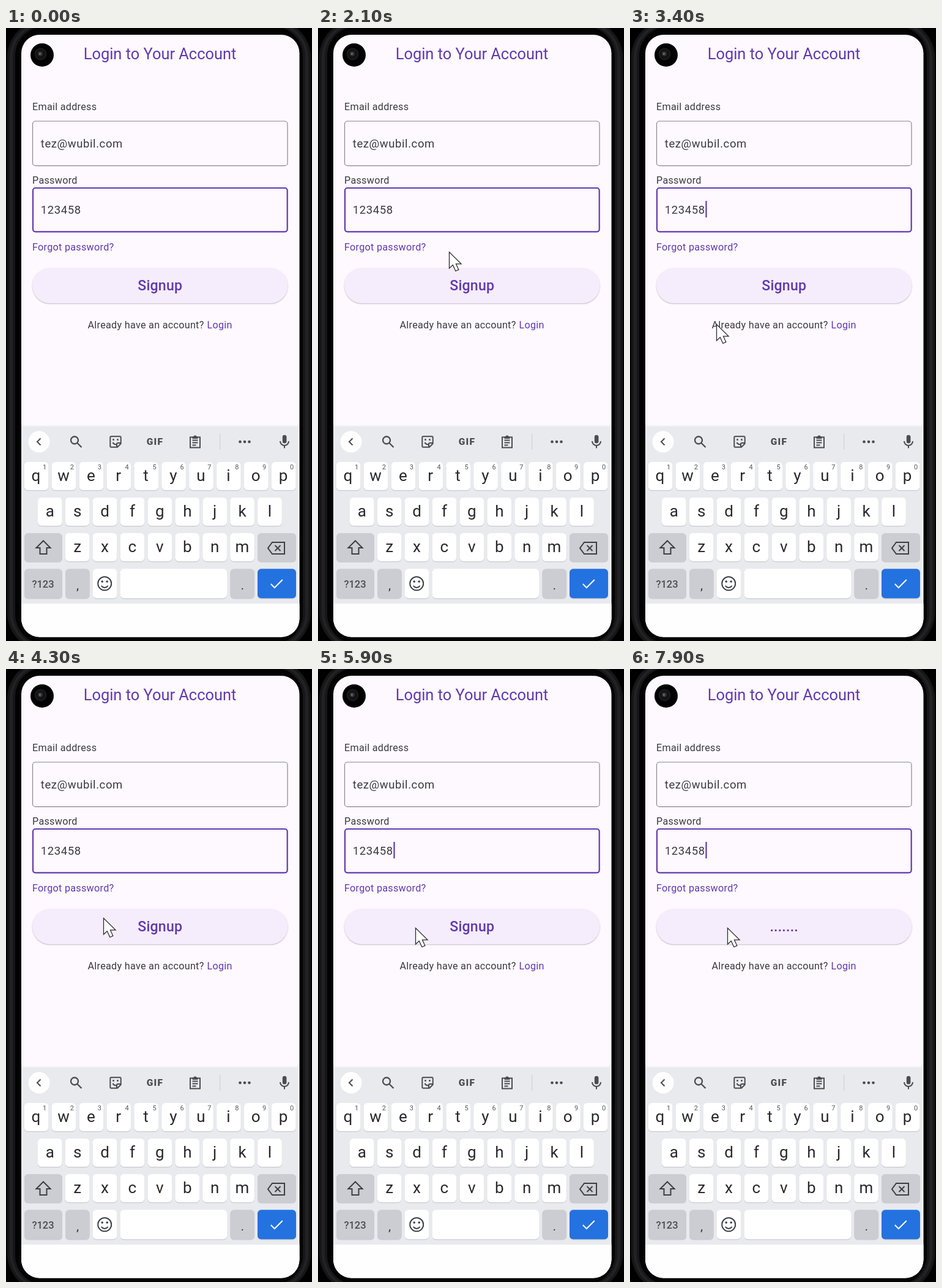
Write an HTML page with a canvas that moves like this. It is 500 by 1000 pixels and loops after 8 s.

```html
<!DOCTYPE html>
<html lang="en">
<head>
<meta charset="utf-8">
<title>Login screen</title>
<style>
  html, body { margin: 0; width: 100%; height: 100%; overflow: hidden; background: #000; }
  canvas { display: block; width: 500px; height: 1000px; }
</style>
</head>
<body>
<canvas id="stage"></canvas>
<script>
const W = 500, H = 1000, LOOP = 8000, STEP = 100;
const PURPLE = '#6138b0', INK = '#3b393f', ICON = '#4a4c50';
const KEY_GRAY = '#cbcdd3', KEY_PITCH = 44.9, KEY_W = 39.6;

const canvas = document.getElementById('stage');
const ctx = canvas.getContext('2d');
const ratio = window.devicePixelRatio || 1;
canvas.width = W * ratio;
canvas.height = H * ratio;

function box(x, y, w, h, r, fill) {
  ctx.beginPath();
  ctx.roundRect(x, y, w, h, r);
  if (fill) { ctx.fillStyle = fill; ctx.fill(); }
}

function disc(x, y, r, fill) {
  ctx.beginPath();
  ctx.arc(x, y, r, 0, Math.PI * 2);
  ctx.fillStyle = fill;
  ctx.fill();
}

function text(str, x, y, size, { color = INK, weight = 400, spacing = 0, align = 'left' } = {}) {
  ctx.font = `${weight} ${size}px Roboto, sans-serif`;
  ctx.letterSpacing = spacing + 'px';
  ctx.textAlign = align;
  ctx.fillStyle = color;
  ctx.fillText(str, x, y);
}

// Icon paths are drawn around their own centre.
function icon(x, y, d, { color = ICON, width = 2, fill = false } = {}) {
  const path = new Path2D(d);
  ctx.save();
  ctx.translate(x, y);
  ctx.lineWidth = width;
  ctx.strokeStyle = ctx.fillStyle = color;
  if (fill) ctx.fill(path); else ctx.stroke(path);
  ctx.restore();
}

function drawPhone() {
  ctx.fillStyle = '#000';
  ctx.fillRect(0, 0, W, H);
  box(2, -14, 496, 1030, 62, '#161617');
  box(6, -10, 488, 1022, 58, '#222224');
  box(11, -6, 478, 1014, 53, '#171718');
  box(15, -3, 470, 1008, 49, '#030303');

  ctx.save();
  box(25, 11, 454.5, 982.5, 30, '#fef9ff');
  ctx.clip();
  ctx.fillStyle = '#e8eaee';
  ctx.fillRect(25, 650, 452, 289);
  ctx.fillStyle = 'rgba(232,234,238,.45)';
  ctx.fillRect(25, 648, 452, 2);
  ctx.fillStyle = '#fefdff';
  ctx.fillRect(25, 939, 455, 60);
  ctx.restore();

  disc(59, 44, 19, '#020202');
  disc(56.5, 42.5, 10, '#1b1b1d');
  disc(56.5, 42.5, 7.5, '#111113');
  disc(56, 42, 4, '#303033');
  disc(55.5, 42, 1.6, '#747478');
}

function drawForm(caretOn) {
  text('Login to Your Account', 251.5, 50.5, 25.4, { color: PURPLE, align: 'center' });
  const label = { spacing: .29 }, link = { spacing: .29, color: PURPLE }, entry = { spacing: .58 };
  text('Email address', 43, 133.5, 16.17, label);
  text('Password', 43, 253.5, 16.17, label);
  text('Forgot password?', 43, 362.5, 16.17, link);
  text('Already have an account? ', 133.5, 489.5, 16.17, label);
  text('Login', 328.5, 489.5, 16.17, link);

  box(43.5, 152, 416.5, 72.7, 4.5);
  ctx.lineWidth = 1.2;
  ctx.strokeStyle = '#89858d';
  ctx.stroke();
  box(44, 261, 415.7, 71.3, 4);
  ctx.lineWidth = 2.2;
  ctx.strokeStyle = PURPLE;
  ctx.stroke();

  text('tez@wubil.com', 56.8, 195, 18.5, entry);
  text('123458', 56.8, 303.2, 18.5, entry);
  if (caretOn) {
    ctx.fillStyle = PURPLE;
    ctx.fillRect(123.4, 282, 2.2, 27);
  }
}

function drawButton(t) {
  ctx.save();
  ctx.shadowColor = 'rgba(0,0,0,.24)';
  ctx.shadowBlur = 2 * ratio;
  ctx.shadowOffsetY = 1.1 * ratio;
  box(43, 391.5, 417.5, 57.5, 28.75, '#f5edfb');
  ctx.restore();

  if (t >= 6000 && t < 6700) {
    const grow = Math.min(1, (t - 5950) / 200);
    const fade = t <= 6250 ? 1 : Math.max(0, 1 - (t - 6250) / 400);
    ctx.save();
    box(43, 391.5, 417.5, 57.5, 28.75);
    ctx.clip();
    disc(159, 423, 310 * grow, `rgba(94,53,177,${.085 * fade})`);
    ctx.restore();
  }
  const caption = t < 6100 ? 'Signup' : '.......';
  text(caption, 251.7, 427.5, 23.1, { color: PURPLE, weight: 500, spacing: .2, align: 'center' });
}

function drawToolbar() {
  disc(54, 675, 17.5, '#fff');
  icon(54, 675, 'M2.5 -5.5L-3 0L2.5 5.5');
  icon(114, 675, 'M4 -2.5A6 6 0 1 1 -8 -2.5A6 6 0 1 1 4 -2.5M2.5 2L9.5 9', { width: 2.3 });
  icon(179, 675, 'M8.7 -7V3L3 8.7H-7Q-8.7 8.7 -8.7 7V-7Q-8.7 -8.7 -7 -8.7H7Q8.7 -8.7 8.7 -7M8.7 2H4Q2 2 2 4V8.7M-4.5 1Q-2.5 5 1 4');
  disc(175.5, 671.5, 1.5, ICON);
  disc(182.5, 671.5, 1.5, ICON);
  text('GIF', 243.5, 680.3, 15.5, { color: ICON, weight: 900, spacing: 1.2, align: 'center' });
  icon(309, 675.5, 'M-8 -8H8V9H-8ZM-4.5 -3H4.5M-4.5 1H4.5M-4.5 5H1.5');
  icon(309, 675.5, 'M-4.5 -9H-2.5A2.6 2.6 0 0 1 2.5 -9H4.5V-5.5H-4.5Z', { fill: true });
  ctx.fillStyle = '#cfd1d5';
  ctx.fillRect(349, 662, 1.2, 26);
  for (let i = -1; i <= 1; i++) disc(390 + i * 7.5, 675, 2.3, ICON);
  box(451.8, 664, 6.6, 13.5, 3.3, ICON);
  icon(455, 675, 'M-7 -1A7 7 0 0 0 7 -1M0 6V10.5');
}

function key(x, y, w, h, fill = '#fff') {
  box(x, y + 1.2, w, h, 6, '#c9cbd0');
  box(x, y, w, h, 6, fill);
}

function letterRow(letters, x0, y, hints = '') {
  [...letters].forEach((ch, i) => {
    const x = x0 + i * KEY_PITCH;
    key(x, y, KEY_W, 46);
    text(ch, x + KEY_W / 2 - (hints ? .6 : 0), y + 31, 26, { color: '#28292c', align: 'center' });
    if (hints) text(hints[i], x + 33.2, y + 12.2, 11, { color: '#55575b', align: 'center' });
  });
}

function drawKeyboard() {
  drawToolbar();
  letterRow('qwertyuiop', 29.8, 708, '1234567890');
  letterRow('asdfghjkl', 52, 766);
  letterRow('zxcvbnm', 96.8, 824);

  key(30, 824, 62, 46.5, KEY_GRAY);
  icon(61, 848, 'M0 -11.5L11.5 0H5.5V10H-5.5V0H-11.5Z', { color: '#3c3e42' });
  key(411, 824, 63, 46.5, KEY_GRAY);
  icon(442, 848.5, 'M-7 -9.5H13V9.5H-7L-14 0ZM-2.5 -4.5L6.5 4.5M6.5 -4.5L-2.5 4.5', { color: '#3c3e42' });

  const bottom = 882.3, tall = 48;
  key(30, bottom, 62, tall, KEY_GRAY);
  text('?123', 60.5, 912.5, 16.5, { color: '#4a4c50', weight: 500, align: 'center' });
  key(97, bottom, KEY_W, tall, KEY_GRAY);
  text(',', 117, 915.5, 21, { align: 'center' });
  key(141.8, bottom, KEY_W, tall);
  icon(161.2, 906.3, 'M11 0A11 11 0 1 1 -11 0A11 11 0 1 1 11 0M-5.5 3.5Q0 10 5.5 3.5', { color: '#3c3e42', width: 1.9 });
  disc(157.2, 903, 1.8, '#3c3e42');
  disc(165.2, 903, 1.8, '#3c3e42');
  key(186.5, bottom, 174.5, tall);
  key(366.5, bottom, KEY_W, tall, KEY_GRAY);
  text('.', 386.2, 916, 21, { align: 'center' });
  key(411, bottom, 63, tall, '#2372e0');
  icon(442.3, 906.5, 'M-9.5 .5L-3.5 6.5L9.5 -6.5', { color: '#fff' });
}

// Pointer stops: time, x, y
const route = [
  [1900, 262, 318], [2100, 214, 365.5], [2900, 141, 483.5],
  [3600, 141, 483.5], [4200, 159, 406.5], [4900, 159, 406.5], [5400, 159, 422.5]
];

function pointerAt(t) {
  if (t < route[0][0]) return null;
  const next = route.findIndex(stop => stop[0] > t);
  if (next < 0) return route[route.length - 1].slice(1);
  const [t0, x0, y0] = route[next - 1], [t1, x1, y1] = route[next];
  const k = (t - t0) / (t1 - t0), ease = k * k * (3 - 2 * k);
  return [x0 + (x1 - x0) * ease, y0 + (y1 - y0) * ease];
}

function drawPointer(t) {
  const at = pointerAt(t);
  if (!at) return;
  const arrow = 'M.5 0V26.5L6.3 21L10.8 31L15.8 28.8L11.5 19.4H20Z';
  icon(...at, arrow, { color: '#fff', fill: true });
  icon(...at, arrow, { color: '#2b2b2e', width: 1.3 });
}

function draw(t) {
  ctx.setTransform(ratio, 0, 0, ratio, 0, 0);
  const blink = t % 1000;
  drawPhone();
  drawForm(blink >= 400 && blink < 950);
  drawButton(t);
  drawKeyboard();
  drawPointer(t);
}

function tick() {
  const t = performance.now() % LOOP;
  draw(Math.floor(t / STEP) * STEP);
  requestAnimationFrame(tick);
}
tick();
</script>
</body>
</html>
```
